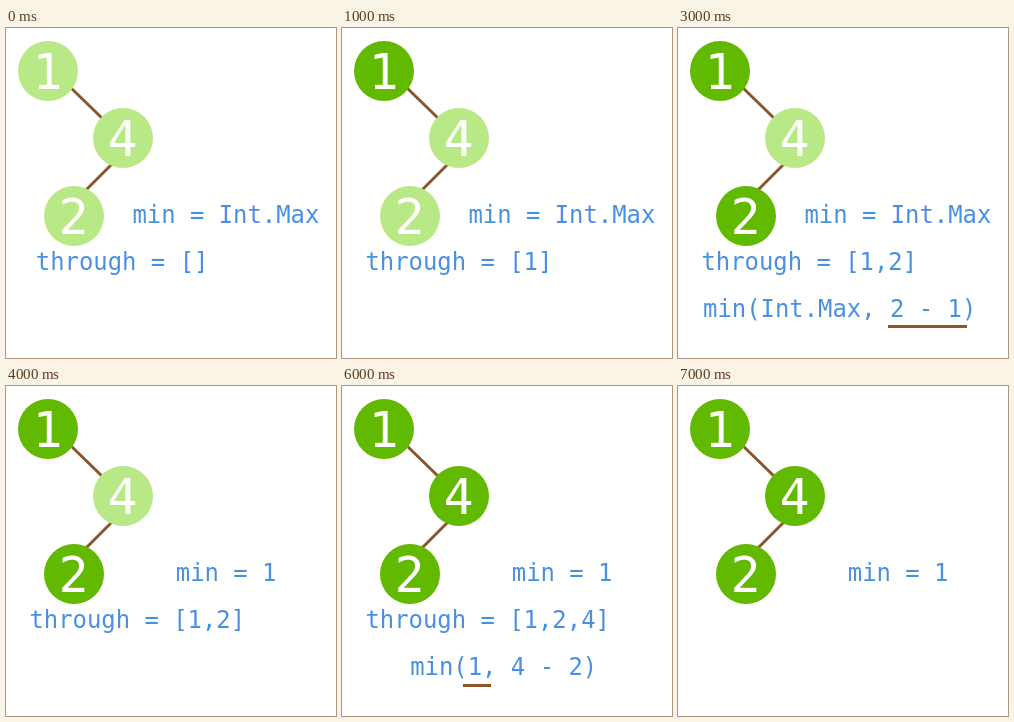
An HTML page that plays this animation: 330 by 330 pixels, repeating every 8 s.

```html
<!DOCTYPE html>
<html lang="en">
<head>
<meta charset="utf-8">
<title>Minimum difference in a search tree</title>
<style>
  html, body { margin: 0; width: 100%; height: 100%; overflow: hidden; background: #fff; }
  svg { display: block; width: 100%; height: 100%; }
  text { font-family: "DejaVu Sans Mono", monospace; white-space: pre; }
  .code { font-size: 23.9px; fill: #4a90e2; }
  .digit { font-size: 50px; fill: #fff; text-anchor: middle; }
  .edge, .underline { stroke: #8b572a; stroke-width: 3; }
</style>
</head>
<body>
<svg viewBox="0 0 330 330">
  <path class="edge" d="M64 59L98 92M107.5 134.5L78.5 163.5" fill="none"/>
  <g id="nodes"></g>
  <text class="code" id="min" y="195"></text>
  <text class="code" id="through" y="242"></text>
  <text class="code" id="compare" y="289"></text>
  <line class="underline" id="underline"/>
</svg>
<script>
const STEP = 1000;
const IDLE = '#b8e986', VISITED = '#62ba00';
const el = id => document.getElementById(id);

// Nodes in visiting order: value, centre, step at which they are visited.
const nodes = [
  { value: 1, x: 42, y: 43, at: 1 },
  { value: 2, x: 68, y: 188, at: 2 },
  { value: 4, x: 117, y: 110, at: 5 },
];

for (const node of nodes) {
  node.group = document.createElementNS('http://www.w3.org/2000/svg', 'g');
  node.group.innerHTML =
    `<circle cx="${node.x}" cy="${node.y}" r="30"/>` +
    `<text class="digit" x="${node.x - 0.5}" y="${node.y + 17.5}">${node.value}</text>`;
  el('nodes').append(node.group);
}

function write(id, x, content) {
  el(id).setAttribute('x', x);
  el(id).textContent = content;
}

function underline(x1, x2, y) {
  const attributes = { x1, x2, y1: y, y2: y };
  for (const name in attributes) el('underline').setAttribute(name, attributes[name]);
}

function draw(step) {
  for (const node of nodes) {
    node.group.setAttribute('fill', step >= node.at ? VISITED : IDLE);
  }

  if (step < 4) write('min', 126.4, 'min = Int.Max');
  else write('min', 169.8, 'min = 1');

  const visited = nodes.filter(node => step >= node.at).map(node => node.value);
  write('through', visited.length ? 23.4 : 29.8, step < 7 ? `through = [${visited}]` : '');

  if (step === 2 || step === 3) write('compare', 25, 'min(Int.Max, 2 - 1)');
  else if (step === 5 || step === 6) write('compare', 68.2, 'min(1, 4 - 2)');
  else write('compare', 0, '');

  if (step === 3) underline(210, 289, 298.5);
  else if (step === 6) underline(121, 149, 299.5);
  else underline(0, 0, 0);
}

let shown = -1;
function tick() {
  const step = Math.floor(performance.now() / STEP) % 8;
  if (step !== shown) draw(shown = step);
  requestAnimationFrame(tick);
}
tick();
</script>
</body>
</html>
```
